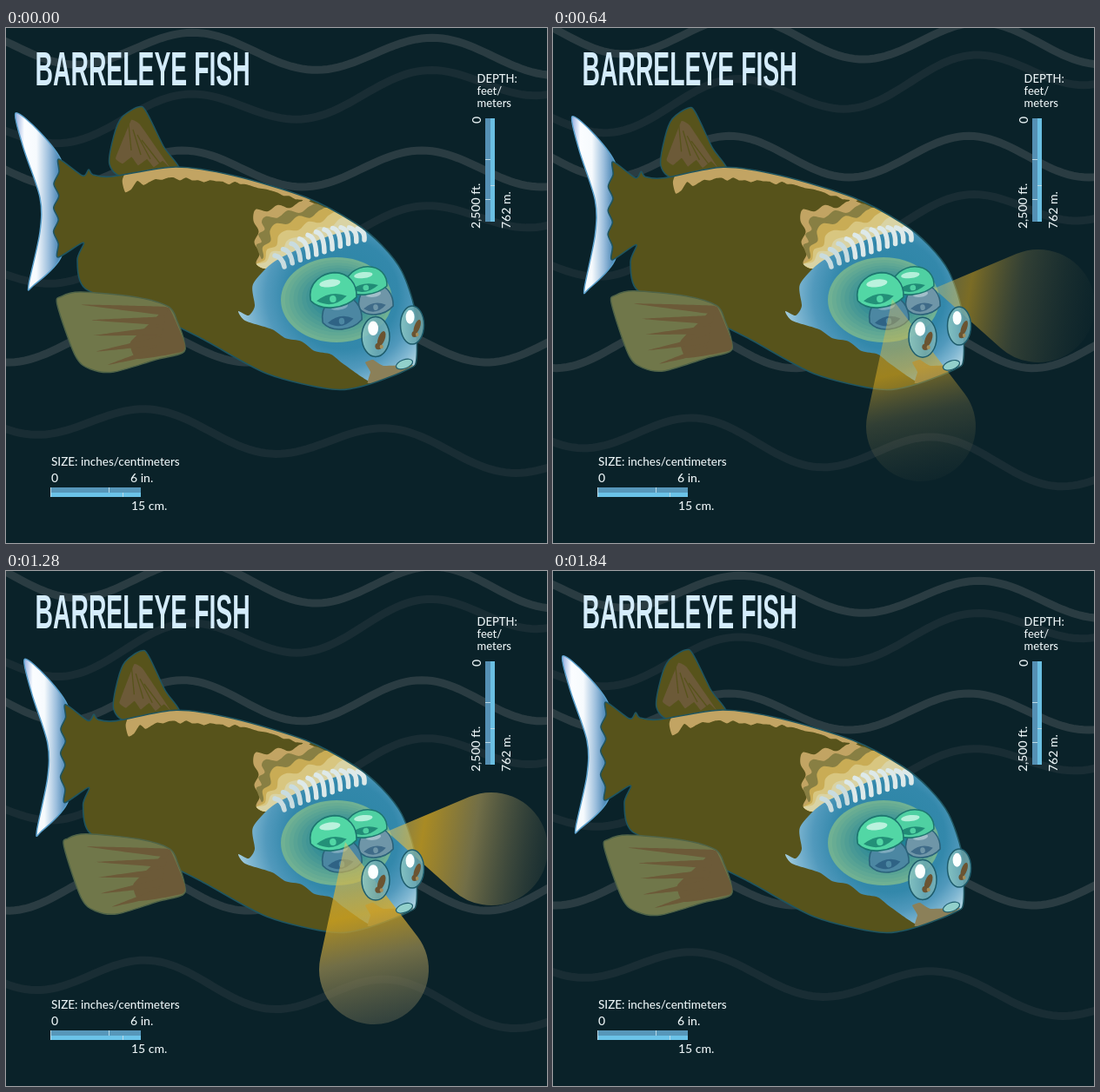
Write an HTML page with a canvas that moves like this. It is 622x593 px and loops after 1.92 s.

```html
<!DOCTYPE html>
<html lang="en">
<head>
<meta charset="utf-8">
<title>Barreleye fish</title>
<style>
html, body { margin: 0; width: 100%; height: 100%; overflow: hidden; background: #0a2229; }
canvas { display: block; }
</style>
</head>
<body>
<canvas id="stage" width="622" height="593"></canvas>
<script>
const ctx = document.getElementById('stage').getContext('2d');
const STEP = 80, STEPS = 24, TAU = Math.PI * 2;
const OLIVE = '#57531b', BROWN = '#6c5a38', FIN = '#70774a', TAN = '#c2a463', EDGE = '#1f5560';

const lerp = (a, b, k) => a + (b - a) * k;
const clamp = v => Math.max(0, Math.min(1, v));
const hash = n => Math.abs(Math.sin(n * 12.9898) * 43758.5453) % 1;

// The tail end sways; the head stays put.
const sway = { x: 0, y: 0 };
function warp(x, y, lift) {
  const w = Math.max(0, (210 - x) / 199);
  return [x + sway.x * w, y + (lift === undefined ? sway.y * w : lift)];
}

// Closed curve through flat x, y pairs; round = 0 gives straight sides.
function outline(pts, round = 0.16, lift) {
  const p = [], n = pts.length / 2, path = new Path2D();
  for (let i = 0; i < n; i++) p.push(warp(pts[2 * i], pts[2 * i + 1], lift));
  path.moveTo(...p[0]);
  for (let i = 0; i < n; i++) {
    const a = p[(i + n - 1) % n], b = p[i], c = p[(i + 1) % n], d = p[(i + 2) % n];
    path.bezierCurveTo(
      b[0] + (c[0] - a[0]) * round, b[1] + (c[1] - a[1]) * round,
      c[0] - (d[0] - b[0]) * round, c[1] - (d[1] - b[1]) * round, c[0], c[1]);
  }
  path.closePath();
  return path;
}

// Points of a zigzag from one place to another, ends excluded.
function ragged(x0, y0, x1, y1, count, size) {
  const out = [], len = Math.hypot(x1 - x0, y1 - y0);
  for (let i = 1; i < count; i++) {
    const k = i / count, off = size * (i % 2 ? 1 : -1) * (0.5 + 0.5 * hash(i)) / len;
    out.push(lerp(x0, x1, k) - (y1 - y0) * off, lerp(y0, y1, k) + (x1 - x0) * off);
  }
  return out;
}

function paint(path, fill, stroke, width = 1.5) {
  if (fill) { ctx.fillStyle = fill; ctx.fill(path); }
  if (stroke) { ctx.strokeStyle = stroke; ctx.lineWidth = width; ctx.stroke(path); }
}

const shape = (pts, fill, round, stroke, lift) => paint(outline(pts, round, lift), fill, stroke);

function oval(x, y, rx, ry, fill, stroke, turn = 0, width = 1.5) {
  const path = new Path2D();
  path.ellipse(x, y, rx, ry, turn, 0, TAU);
  paint(path, fill, stroke, width);
}

function fade(gradient, ...stops) {
  for (const [at, color] of stops) gradient.addColorStop(at, color);
  return gradient;
}

const WAVES = [
  { y: 28, amp: 20, tilt: 0.022, crest: 217, bright: true },
  { y: 84, amp: 21, tilt: -0.1, crest: 480 },
  { y: 162, amp: 21, tilt: 0, crest: 203, bright: true },
  { y: 241, amp: 20, tilt: -0.117, crest: 474 },
  { y: 363, amp: 22, tilt: 0, crest: 415, bright: true },
  { y: 473, amp: 20, tilt: 0.08, crest: 166 }
];

// Waves drift apart from the middle of the stage as they swell.
function drawWaves(swell) {
  ctx.lineWidth = 9;
  for (const w of WAVES) {
    const mid = w.y + 17 * swell * Math.tanh((w.y - 335) / 110);
    const amp = w.amp * (1 + 0.15 * swell);
    ctx.strokeStyle = w.bright ? '#2a3c42' : '#192d34';
    ctx.beginPath();
    for (let x = -8; x <= 630; x += 6) {
      ctx.lineTo(x, mid + w.tilt * (x - 340) - amp * Math.cos((x - w.crest) * TAU / 275));
    }
    ctx.stroke();
  }
}

function drawTail() {
  const g = fade(ctx.createLinearGradient(10 + sway.x, 0, 60 + sway.x * 0.8, 0),
    [0, '#8fa9de'], [0.22, '#fbfdff'], [0.5, '#f6fafd'], [0.78, '#9dbfdd'], [1, '#4f8ab8']);
  shape([11,98, 38,119, 64,154, 66,200, 64,262, 31,297, 26,296, 39,235, 39,195, 20,138],
    g, 0.15, '#5aa0cc');
}

// Brown spikes running from one edge of a fin towards another.
function rays(base, tips, count, lift) {
  for (let i = 0; i < count; i++) {
    const at = k => [lerp(base[0], base[2], k), lerp(base[1], base[3], k)];
    const k = i / count, reach = 0.78 + 0.22 * hash(i + 3);
    const [ax, ay] = at(k), [bx, by] = at(k + 0.85 / count);
    const tx = lerp(tips[0], tips[2], k + 0.1), ty = lerp(tips[1], tips[3], k + 0.1);
    shape([ax, ay, lerp(ax, tx, reach), lerp(ay, ty, reach), bx, by], BROWN, 0.04, null, lift);
  }
}

function drawDorsal() {
  shape([138,172, 119,157, 124,124, 133,103, 152,91, 161,96, 181,136, 198,166], OLIVE, 0.15, EDGE);
  shape([126,150, 144,106, 154,111, 188,160, ...ragged(188, 160, 126, 150, 7, 6)], BROWN, 0.04);
  ctx.strokeStyle = OLIVE;
  ctx.lineWidth = 1.3;
  for (let i = 0; i < 4; i++) {
    ctx.beginPath();
    ctx.moveTo(...warp(141 + i * 5, 111 + i * 6));
    ctx.lineTo(...warp(144 + i * 11, 141 + i * 5));
    ctx.stroke();
  }
}

const BODY = [61,151, 88,170, 95,163, 100,169, 122,171, 195,160, 262,170, 345,195, 402,225, 432,250,
  455,280, 470,325, 472,381, 462,393, 415,411, 375,416, 300,398, 222,356, 150,322, 91,300,
  82,267, 89,247, 60,264, ...ragged(56, 262, 59, 152, 8, 4)];

function drawBack() {
  const strip = [350, 190, 262, 160, 150, 160, 134, 174];
  for (let x = 137; x < 350; x += 7) {
    const k = (x - 137) / 213, spine = 160 + 0.04 * (x - 190) + 0.0012 * (x - 190) ** 2;
    strip.push(x, spine + lerp(24, 5, Math.sqrt(k)) + lerp(9, 2, k) * (hash(x) - 0.4));
  }
  shape(strip, TAN, 0.1);

  // Overlapping scalloped bands at the nape.
  [TAN, '#887f43', '#c9ac55', '#d8c680', '#d9d3a5'].forEach((color, i) => {
    const k = i / 4, x = lerp(287, 334, k), y = lerp(209, 241, k);
    const ex = lerp(352, 398, k), ey = lerp(201, 217, k), by = i === 1 ? 252 : 272;
    shape([288, by, ...ragged(288, by, x, y, 5, 4), x, y,
      ...ragged(x, y, ex, ey, 5, 4), ex, ey, 414, 236, 350, 252, 306, 276], color, 0.17);
  });
}

function drawHead() {
  const skin = fade(ctx.createRadialGradient(394, 304, 20, 380, 310, 116),
    [0, '#2d86a6'], [0.45, '#3388ab'], [0.68, '#5199bc'], [0.87, '#80b7d2'], [1, '#a9d0df']);
  shape([310,268, 284,295, 286,320, 279,331, 267,326, 275,337, 306,347,
    ...ragged(306, 347, 406, 393, 6, 3), 418,407, 424,397, 490,400, 480,300, 450,250,
    414,232, 370,240], skin, 0.12);
  shape([416,409, 419,396, 413,385, 422,382, 434,389, 468,388, 442,406], '#8b8059', 0.06);
  ctx.lineCap = 'round';
  ctx.lineWidth = 5.5;
  for (let i = 0; i < 11; i++) {
    const u = i / 10, x = 309 + 95 * u, y = 262 - 78 * u + 47 * u * u;
    ctx.strokeStyle = u > 0.25 ? '#dde9e9' : '#c9dcdf';
    ctx.beginPath();
    ctx.moveTo(x, y);
    ctx.quadraticCurveTo(x + 9, y + 2, x + 11 - 3 * u, y + 13 + 10 * Math.sin(Math.PI * u));
    ctx.stroke();
  }
  ctx.lineCap = 'butt';
}

function drawRings() {
  for (let i = 0; i < 12; i++) {
    const k = i / 11;
    const c = [lerp(112, 25, k), lerp(177, 125, k), lerp(147, 151, k)].map(Math.round);
    oval(380 + 6 * k, 313 - 4 * k, lerp(64, 17, k), lerp(49, 11, k), `rgb(${c})`);
  }
}

function drawEye(x, y, rx, ry, top, dark, shine, line) {
  ctx.save();
  ctx.translate(x, y);
  ctx.rotate(-0.12);
  const dome = new Path2D();
  dome.moveTo(-rx, ry * 0.45);
  dome.bezierCurveTo(-rx * 1.05, -ry * 0.7, -rx * 0.3, -ry * 1.05, rx * 0.15, -ry);
  dome.bezierCurveTo(rx * 0.75, -ry * 0.9, rx * 1.05, -ry * 0.2, rx * 0.96, ry * 0.55);
  dome.bezierCurveTo(rx * 0.4, ry * 1.15, -rx * 0.6, ry * 1.15, -rx, ry * 0.45);
  paint(dome, top, line, 1.6);
  const lid = new Path2D();
  lid.moveTo(-rx * 0.75, ry * 0.5);
  lid.quadraticCurveTo(-rx * 0.1, -ry * 0.05, rx * 0.55, ry * 0.42);
  lid.quadraticCurveTo(-rx * 0.1, ry * 1.1, -rx * 0.75, ry * 0.5);
  paint(lid, dark);
  oval(-rx * 0.05, ry * 0.5, rx * 0.14, ry * 0.2, top);
  oval(-rx * 0.1, -ry * 0.42, rx * 0.45, ry * 0.22, shine);
  ctx.restore();
}

function drawEyes() {
  drawEye(425, 313, 20, 17, '#6f96a8', '#3f6b88', '#a3bfca', '#2a627a');
  drawEye(386, 328, 23, 19, '#4c87a2', '#2f6385', '#7fabbf', '#2a627a');
  drawEye(414, 291, 24, 16, '#4fd0a2', '#218b76', '#b4f0da', '#1d766f');
  drawEye(376, 302, 27, 20, '#52d7a5', '#239078', '#baf2dd', '#1d766f');
}

// A teardrop of light from a point to the circle it touches.
function drawBeam(ax, ay, cx, cy, r, glow, peak, far) {
  const dx = cx - ax, dy = cy - ay, d = Math.hypot(dx, dy), end = (d + r) / d;
  const back = Math.atan2(-dy, -dx), off = Math.acos(r / d);
  const near = Math.sqrt(glow);
  const g = fade(ctx.createLinearGradient(ax, ay, ax + dx * end, ay + dy * end),
    [0, `rgba(222,200,110,${0.5 * near})`],
    [peak, `rgba(214,168,34,${0.78 * near})`],
    [lerp(peak, 1, 0.4), `rgba(146,134,80,${0.76 * glow ** 1.4})`],
    [1, `rgba(84,92,78,${far * glow ** 3})`]);
  ctx.beginPath();
  ctx.moveTo(ax, ay);
  ctx.arc(cx, cy, r, back + off, back - off + TAU);
  ctx.closePath();
  ctx.fillStyle = g;
  ctx.fill();
}

function drawBubble(x, y, rx, ry) {
  const g = fade(ctx.createLinearGradient(x - rx, y, x + rx, y),
    [0, 'rgba(139,199,196,.9)'], [0.6, 'rgba(105,167,176,.85)'], [1, 'rgba(126,181,184,.85)']);
  oval(x, y, rx, ry, g, '#1d5c6c');
  oval(x + rx * 0.42, y + ry * 0.1, rx * 0.24, ry * 0.4, '#6b5432', null, 0.35);
  oval(x + rx * 0.2, y + ry * 0.48, rx * 0.24, ry * 0.16, '#6b5432');
  oval(x + rx * 0.42, y + ry * 0.5, rx * 0.13, ry * 0.1, '#a58e5a');
  oval(x - rx * 0.18, y - ry * 0.42, rx * 0.37, ry * 0.36, '#fbffff');
}

function drawPectoral(lift) {
  shape([59,319, 64,309, 86,304, 150,310, 187,321, 197,338, 205,362, 203,374, 172,382, 124,396,
    98,393, 80,378], FIN, 0.15, '#4f6347', lift);
  shape([187,322, 205,362, 202,373, 151,381, 143,362, 168,338], BROWN, 0.08, null, lift);
  rays([184, 321, 172, 378], [72, 309, 108, 402], 5, lift);
}

function label(text, x, y, size, turned) {
  ctx.save();
  ctx.translate(x, y);
  if (turned) ctx.rotate(-Math.PI / 2);
  ctx.font = `500 ${size}px Lato, sans-serif`;
  ctx.fillStyle = '#eaf3f5';
  ctx.fillText(text, 0, 0);
  ctx.restore();
}

function box(x, y, w, h, color) {
  ctx.fillStyle = color;
  ctx.fillRect(x, y, w, h);
}

function drawText() {
  ctx.save();
  ctx.translate(33.5, 66);
  ctx.scale(0.506, 1); // condensed capitals
  ctx.font = 'bold 56px "Liberation Sans", Arial, sans-serif';
  ctx.fillStyle = '#d4ecfb';
  ctx.fillText('BARRELEYE FISH', 0, 0);
  ctx.restore();

  ['DEPTH:', 'feet/', 'meters'].forEach((word, i) => label(word, 541.5, 63 + 14 * i, 13));
  label('0', 546, 110, 14, true);
  label('2,500 ft.', 545, 231, 14, true);
  label('762 m.', 580, 231, 14, true);
  box(551, 104, 6, 119, '#5590b4');
  box(557, 104, 5, 119, '#6abfe2');
  box(551, 151, 6, 1, '#b9d9e6');
  box(557, 181, 5, 1, '#b9d9e6');
  box(551, 197, 6, 1, '#b9d9e6');

  label('SIZE: inches/centimeters', 52, 504, 13.5);
  label('0', 52, 523, 14);
  label('6 in.', 143, 523, 14);
  label('15 cm.', 144, 555, 14);
  box(52, 529, 103, 6, '#5797ba');
  box(52, 535, 103, 5, '#6bc3e8');
  box(51, 529, 1, 11, '#b9d9e6');
  box(118, 529, 1, 6, '#b9d9e6');
  box(134, 535, 1, 5, '#b9d9e6');
}

function draw(time) {
  const step = Math.floor(time / STEP) % STEPS;
  const swell = Math.sin(Math.PI * step / (STEPS - 1));
  const dip = Math.sin(Math.PI * clamp(step / 8));
  const nod = 1.5 * swell + 2 * dip;
  const glow = clamp(Math.min(step - 6, 21 - step) / 4);
  sway.x = 12 * swell ** 0.8;
  sway.y = 4.5 * swell - 5.5 * dip;

  box(0, 0, 622, 593, '#0a2229');
  drawWaves(swell);
  drawTail();
  drawDorsal();

  const body = outline(BODY, 0.14);
  paint(body, OLIVE);
  ctx.save();
  ctx.clip(body);
  drawBack();
  drawHead();
  ctx.restore();
  paint(body, null, EDGE, 1.6);

  drawRings();
  drawEyes();
  if (glow > 0) {
    drawBeam(390, 312, 423, 459, 63, glow, 0.4, 0.55);
    drawBeam(438, 300, 558, 320, 65, glow, 0.22, 0.22);
  }
  oval(458, 387 + nod, 10, 5, '#92d0cb', '#1d5c6c', -0.35, 1.2);
  drawBubble(425, 355.5 + nod * 0.5, 16, 23);
  drawBubble(467, 342 + nod * 0.8, 13.5, 22);
  drawPectoral(-1.5 * swell - 3 * dip);
  drawText();
}

const start = performance.now();
function tick() {
  draw(performance.now() - start);
  requestAnimationFrame(tick);
}
tick();
</script>
</body>
</html>
```
